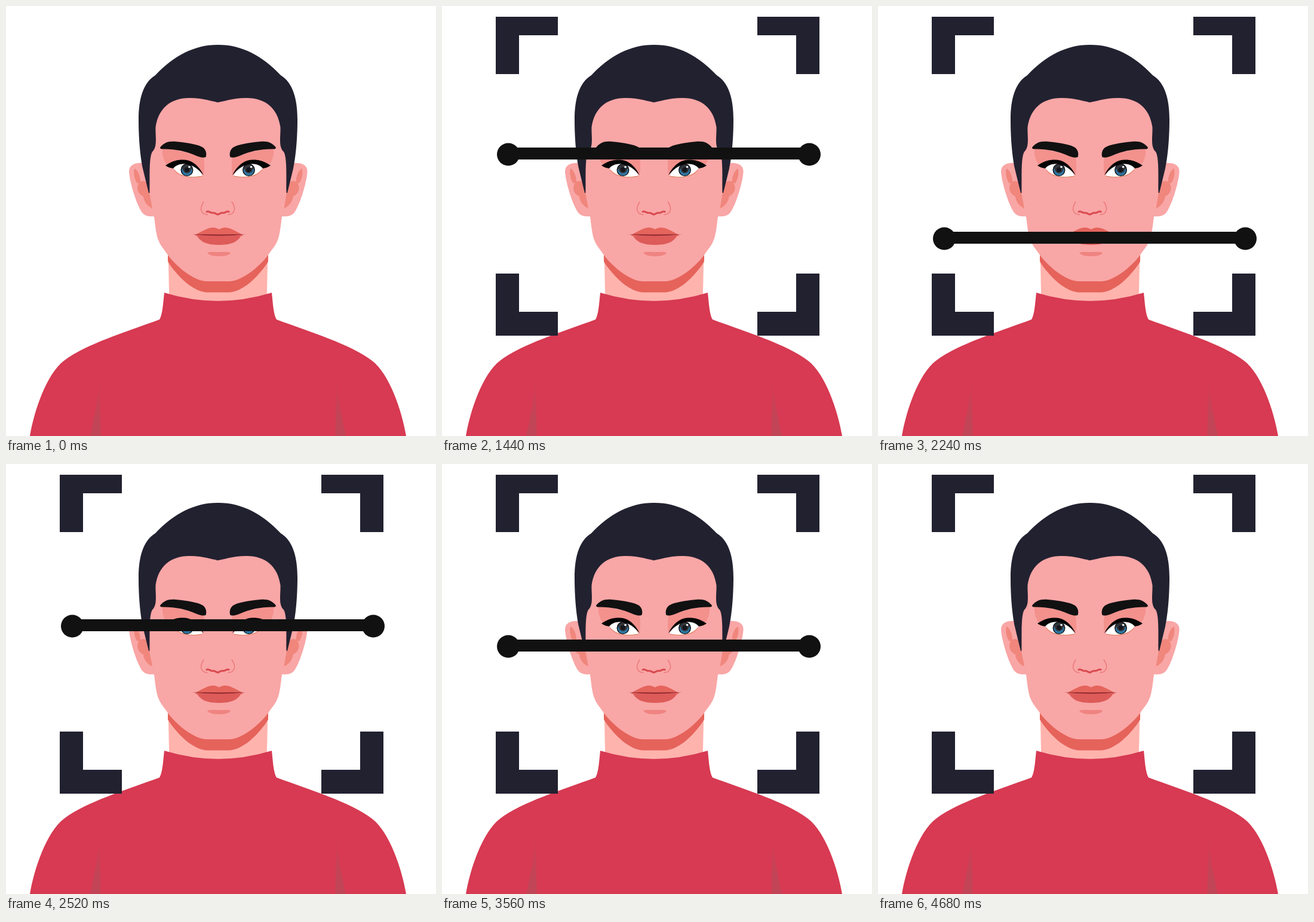
Recreate the animation shown at these times as an HTML page with a canvas. Size 720 px wide and 720 px high, loop 5000 ms.

```html
<!DOCTYPE html>
<html lang="en">
<head>
<meta charset="utf-8">
<title>Face scan</title>
<style>
html, body { margin: 0; width: 100%; height: 100%; overflow: hidden; background: #fff; }
canvas { display: block; width: 720px; height: 720px; }
</style>
</head>
<body>
<canvas id="stage" width="720" height="720"></canvas>
<script>
const LOOP = 5000, STEP = 40;
const INK = '#222130', BLACK = '#111111', SKIN = '#f9a6a6', SHIRT = '#d73a52';
const TOP = 140, TRAVEL = 278;

const stage = document.getElementById('stage').getContext('2d');
const portrait = document.createElement('canvas');
portrait.width = portrait.height = 720;
const pen = portrait.getContext('2d');

// Draws once as given and once mirrored about the vertical line x = axis.
function both(axis, draw) {
  draw();
  pen.save();
  pen.translate(2 * axis, 0);
  pen.scale(-1, 1);
  draw();
  pen.restore();
}

function shape(color, d) {
  pen.fillStyle = color;
  pen.fill(new Path2D(d));
}

function line(color, width, d) {
  pen.strokeStyle = color;
  pen.lineWidth = width;
  pen.lineCap = 'round';
  pen.stroke(new Path2D(d));
}

function dot(ctx, color, x, y, r) {
  ctx.fillStyle = color;
  ctx.beginPath();
  ctx.arc(x, y, r, 0, 7);
  ctx.fill();
}

function drawBody() {
  both(355, () => {
    shape('#ffb3ad', 'M271.5 410L273.5 500H357V410Z');
    shape('#e5635a', 'M271 405V428C287 453 314 479.5 338 479.5H357V405Z');
  });
  both(355, () => {
    shape(SHIRT, 'M265 480Q311 494 357 494V720H40C47 678 68 616 97 594C134 566 200 546 257 525C262 517 263 499 265 480Z');
    const fade = pen.createLinearGradient(0, 625, 0, 690);
    fade.addColorStop(0, SHIRT);
    fade.addColorStop(1, '#c24557');
    shape(fade, 'M157 625Q151 678 141 720H158.5Z');
  });
}

function drawHead() {
  both(355.3, () => {
    shape(SKIN, 'M236 264C222 261 206 263 206 277C207 296 219 334 228 346C233 352 240 353 250 352Z');
    shape('#f0867c', 'M215 272C221 275 225 285 225 295L220 297C215 291 213 279 215 272Z');
    shape('#f0867c', 'M222 297C226 292 232 292 236 296L241 313L245 339C239 336 231 330 230 319C222 315 217 307 222 297Z');
  });
  both(355, () => {
    shape(SKIN, 'M357 140H256L238 250L240 313L248 353C250 366 251 384 256 394C259 402 266 409 271 417C286 437 315 461 337 461H357Z');
    shape(INK, 'M357 65C318 64 282 82 250 116C230 128 222 155 222 190C222 229 226 258 229 272Q234 293 239 313H240.5' +
      'C241 288 239 254 245 244C254 236 250 218 250.5 203C255 171 276 154 307 154C332 154 348 161 357 161.5Z');
  });
}

function drawEyes() {
  both(355, () => {
    shape('#f3918d', 'M262 237C261 249 264 258 268 264L331 281C333 269 332 258 330 251Z');
    shape(BLACK, 'M258 237C264 229 272 226 284 227C306 229 322 232 330 237C336 242 336 249 334.5 253' +
      'C330 255 324 253 318 250.5C301 243 282 239 261 239.5Q258 239 258 237Z');
    shape('#fff', 'M279 270C288 260 316 258 329 284C314 289 290 287 279 270Z');
    line('#d6784f', 1, 'M282 275C291 287 312 288 328 285');
  });
  for (const x of [303, 406.5]) {
    dot(pen, '#15161d', x, 274.5, 10.5);
    dot(pen, '#2d78a6', x, 275, 8.8);
    dot(pen, '#34353a', x, 273, 7);
    shape('#34353a', `M${x - 9} 273Q${x} 258 ${x + 9} 273Z`);
    dot(pen, '#15161d', x, 274, 4);
    dot(pen, '#f2f4f5', x + 4, 269.5, 1.8);
  }
  both(355, () => shape('#050505',
    'M267 267C279 259 288 257 298 257.5C314 258 325 271 331 283.5C322 273 311 264.5 299 264.5C289 264.5 284 267 280 272Q272 271 267 267Z'));
}

function drawNoseAndMouth() {
  both(354.6, () => {
    line('#ec7777', 1.4, 'M331 328C324 338 325 348 337 349.5');
    line('#d94b50', 3, 'M336 344.5C339 342.5 342 346.5 346 346.5C349 345 351 349 355 349');
  });
  both(356.7, () => {
    shape('#e5645c', 'M317 383C329 377 339 370 349 371Q354 372 358 374.5V385H317Z');
    shape('#dd5b59', 'M319 383.5C326 396 337 400 358 400V383.5Z');
    shape('#ef8481', 'M337 413C342 411 349 412 358 412V419C349 419 340 418 337 413Z');
  });
  shape('#7d1f2b', 'M311 382Q356 383.5 402 382Q357 387 311 382Z');
}

// Ease in and out, a smooth curve through a few (time, progress) knots.
const KNOTS = [[0, 0], [.12, .026], [.24, .104], [.36, .25], [.52, .529], [.68, .777], [.8, .924], [.92, .9873], [1, 1]];

function slope(i) {
  const a = KNOTS[i - 1], b = KNOTS[i + 1];
  return a && b ? (b[1] - a[1]) / (b[0] - a[0]) : 0;
}

function ease(p) {
  if (p <= 0) return 0;
  if (p >= 1) return 1;
  const i = KNOTS.findIndex(k => k[0] > p) - 1;
  const [x0, y0] = KNOTS[i], [x1, y1] = KNOTS[i + 1];
  const w = x1 - x0, u = (p - x0) / w, v = 1 - u;
  return y0 * v * v * (1 + 2 * u) + y1 * u * u * (3 - 2 * u) +
    w * u * v * (slope(i) * v - slope(i + 1) * u);
}

const phase = (t, start, length) => ease((t - start) / length);

function scaledAbout(x, y, sx, sy, draw) {
  if (sx < .003) return;
  stage.save();
  stage.translate(x, y);
  stage.scale(sx, sy);
  stage.translate(-x, -y);
  draw();
  stage.restore();
}

function drawBrackets() {
  stage.fillStyle = INK;
  for (const [x, bar] of [[90, 90], [528, 593]]) {
    stage.fillRect(x, 18, 104, 31);
    stage.fillRect(bar, 18, 39, 96);
    stage.fillRect(x, 512, 104, 40);
    stage.fillRect(bar, 448, 39, 104);
  }
}

function drawScanner(y) {
  dot(stage, BLACK, 111, y + .5, 19);
  dot(stage, BLACK, 615, y + .5, 19);
  stage.fillRect(111, y - 11, 504, 20);
}

function render(t) {
  stage.drawImage(portrait, 0, 0);
  const frame = phase(t, 0, 500);
  scaledAbout(361, 285, frame, frame, drawBrackets);
  const y = Math.round(TOP + TRAVEL * (phase(t, 1000, 1000) - phase(t, 2000, 1000) + phase(t, 3000, 1000)));
  const width = phase(t, 500, 500) - phase(t, 4000, 700);
  scaledAbout(363, y, width, 1, () => drawScanner(y));
}

pen.fillStyle = '#fff';
pen.fillRect(0, 0, 720, 720);
drawBody();
drawHead();
drawEyes();
drawNoseAndMouth();

const begin = performance.now();
function tick() {
  const t = (performance.now() - begin) % LOOP;
  render(Math.floor(t / STEP) * STEP);
  requestAnimationFrame(tick);
}
tick();
</script>
</body>
</html>
```
